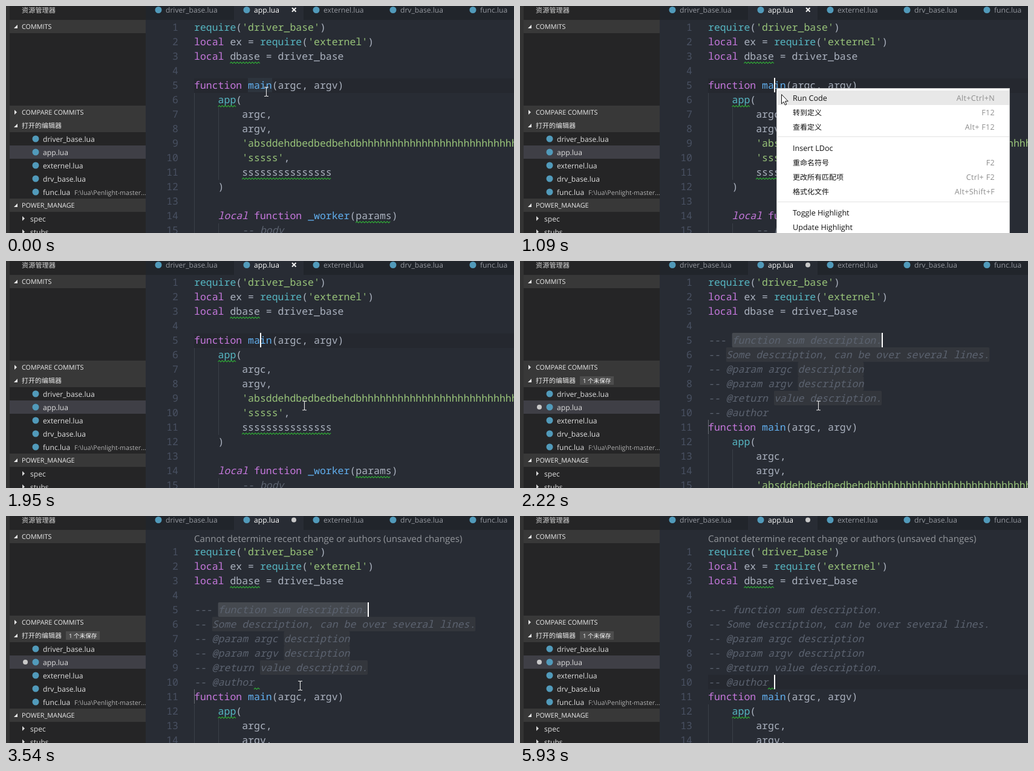
An HTML page for the animation above (6080 ms loop, 840 by 376 pixels).

```html
<!DOCTYPE html>
<html lang="en">
<head>
<meta charset="utf-8">
<title>Insert doc comment</title>
<style>
  html, body { margin: 0; width: 100%; height: 100%; overflow: hidden; background: #282c34; }
  svg { display: block; width: 840px; height: 376px; }
  text { white-space: pre; text-rendering: geometricPrecision; fill: #abb2bf; }
  .code { font: 500 16.5px "Noto Sans Mono", "DejaVu Sans Mono", monospace; }
  .num { fill: #495162; text-anchor: end; }
  .ui { font-family: "Open Sans", "Noto Sans CJK SC", "Noto Sans CJK", sans-serif; }
  .k { fill: #c678dd; }
  .i { fill: #c678dd; font-style: italic; }
  .b { fill: #56b6c2; }
  .f { fill: #61afef; }
  .s { fill: #98c379; }
  .c { fill: #5c6370; font-style: italic; }
</style>
</head>
<body>
<svg id="stage" viewBox="0 0 840 376"></svg>
<script>
const LOOP = 6080;
const COL = 9.9, LINE = 24, LEFT = 311, TOP = 24;
const stage = document.getElementById('stage');

function add(parent, tag, attrs = {}, text) {
  const el = document.createElementNS('http://www.w3.org/2000/svg', tag);
  for (const key in attrs) el.setAttribute(key, attrs[key]);
  if (text !== undefined) el.textContent = text;
  parent.appendChild(el);
  return el;
}
const group = parent => add(parent, 'g');
const rect = (parent, x, y, width, height, fill) =>
  add(parent, 'rect', { x, y, width, height, fill });
const label = (parent, x, y, size, fill, text, more = {}) =>
  add(parent, 'text', { x, y, class: 'ui', style: `font-size:${size}px;fill:${fill}`, ...more }, text);
const shape = (parent, points, fill) => add(parent, 'polygon', { points, fill });
const dot = (parent, cx, cy, r, fill) => add(parent, 'circle', { cx, cy, r, fill });

const colX = col => LEFT + col * COL;
const lineY = line => TOP + (line - 1) * LINE;

// Tokens are split by "|"; a leading "x:" names the token's class.
function codeText(parent, x, y, source) {
  const el = add(parent, 'text', { class: 'code', x, y });
  for (const part of source.split('|')) {
    const [, kind, text] = part.match(/^(?:([a-z]):)?(.*)$/);
    add(el, 'tspan', kind ? { class: kind } : {}, text);
  }
}
function codeLines(parent, lines) {
  lines.forEach((source, i) => source && codeText(parent, LEFT, lineY(i + 1) + 17, source));
}
function squiggle(parent, line, from, count) {
  const end = colX(from + count), y = lineY(line) + 23.2;
  let d = `M${colX(from)} ${y}`;
  for (let x = colX(from) + 2, up = true; x <= end; x += 2.5, up = !up) d += `L${x} ${up ? y - 2.4 : y}`;
  add(parent, 'path', { d, fill: 'none', stroke: '#2fa835', 'stroke-width': 1.1 });
}
const guide = (parent, col, from, to) =>
  rect(parent, Math.round(colX(col)), lineY(from), 1, (to - from + 1) * LINE, '#3b4048');
const mark = (parent, line, col, count, fill) =>
  add(parent, 'rect', { x: colX(col), y: lineY(line) - 1, width: count * COL, height: LINE, rx: 2, fill });
const caret = (parent, line, x) => rect(parent, x, lineY(line) - 1, 2, LINE, '#fff');

// Each track holds [time, value] steps, applied as hard changes.
const tracks = [];
const track = (steps, apply) => tracks.push({ steps, apply, last: null });
const fade = (el, ...steps) => track(steps, v => {
  el.style.display = v ? '' : 'none';
  el.style.opacity = v;
});

const head = ["b:require|(|s:'driver_base'|)", "k:local| ex = |b:require|(|s:'externel'|)",
  'k:local| dbase = driver_base', ''];
const body = ['k:function| |f:main|(argc, argv)', '    |b:app|(', '        argc,', '        argv,',
  "        |s:'absddehdbedbedbehdb" + 'h'.repeat(32), "        |s:'sssss'|,", '        sssssssssssssss',
  '    )', '', '    |i:local| |k:function| |f:_worker|(params)', '        |c:-- body'];
const doc = ['--- function sum description.', '-- Some description, can be over several lines.',
  '-- @param argc description', '-- @param argv description', '-- @return value description.',
  '-- @author '].map(text => 'c:' + text);

rect(stage, 0, 0, 840, 376, '#282c34');
const BAND = '#25282f';

// Code before the insertion
const before = group(stage);
rect(before, LEFT, lineY(5), 529, LINE, BAND);
const wordMark = rect(before, 400, lineY(5) - 1, 40, LINE, '#2d343d');
guide(before, 0, 6, 15);
guide(before, 4, 7, 11);
guide(before, 4, 15, 15);
codeLines(before, [...head, ...body]);
[[3, 6, 5], [6, 4, 3], [11, 8, 15], [14, 27, 6]].forEach(s => squiggle(before, ...s));
const firstCaret = caret(before, 5, 420);
fade(before, [0, 1], [2100, 0]);
fade(wordMark, [0, 1], [700, 0]);
fade(firstCaret, [0, 0], [850, 1]);

// Code after the insertion, later pushed down one line
const after = group(stage);
const band = rect(after, LEFT, lineY(10) - 1, 529, LINE, BAND);
const fields = group(after);
mark(fields, 5, 4, 25, '#45494f');
[[6, 3, 44], [7, 15, 11], [8, 15, 11], [9, 11, 18]].forEach(m => mark(fields, ...m, '#33363c'));
rect(fields, LEFT, lineY(11) - 1, 1, LINE, '#686c72');
guide(after, 0, 12, 15);
guide(after, 4, 13, 15);
codeLines(after, [...head, ...doc, ...body.slice(0, 5)]);
caret(fields, 5, 598);
const marks = group(after);
[[3, 6, 5], [12, 4, 3], [10, 10, 1]].forEach(s => squiggle(marks, ...s));
const lastCaret = caret(after, 10, 420);
fade(after, [0, 0], [2100, 1]);
fade(fields, [0, 1], [3980, 0]);
fade(band, [0, 0], [3980, 1]);
fade(marks, [0, 0], [2610, 1]);
fade(lastCaret, [0, 0], [3980, 1], [4590, 0], [5020, 1], [5530, 0], [5930, 1]);

const gutter = group(stage);
for (let n = 1; n <= 15; n++)
  add(gutter, 'text', { class: 'code num', x: 285, y: lineY(n) + 17 }, n);
track([[0, 0], [2490, LINE]], dy => {
  for (const el of [after, gutter]) el.setAttribute('transform', `translate(0 ${dy})`);
});

const lens = label(stage, LEFT, 43, 15.1, '#94979c',
  'Cannot determine recent change or authors (unsaved changes)');
fade(lens, [0, 0], [3010, .1], [3130, .3], [3270, .52], [3400, .78], [3540, 1]);

// Signature popup
const hint = group(stage);
add(hint, 'rect', { x: 400.5, y: 87.5, width: 258, height: 31, fill: '#2d2d30', stroke: '#454545' });
codeText(hint, 406, 109, body[0]);
fade(hint, [0, 0], [430, .5], [580, 1], [700, 0]);

// Tabs
rect(stage, 231, 0, 609, 23, '#21252b');
rect(stage, 377, 0, 115, 24, '#282c34');
[['driver_base.lua', 231], ['app.lua', 377], ['externel.lua', 492], ['drv_base.lua', 619],
  ['func.lua', 751]].forEach(([name, x]) => {
  const active = name === 'app.lua';
  dot(stage, x + 21, 6.5, 5.5, '#519aba');
  label(stage, x + 33, 11, 12.1, active ? '#fff' : '#95989f', name);
});
const cross = add(stage, 'path', { d: 'M473 3l6.5 6.5M479.5 3l-6.5 6.5', stroke: '#f0f0f0', 'stroke-width': 2 });
const dirty = group(stage);
dot(dirty, 476, 6.5, 4, '#c8c8c8');

// Sidebar
rect(stage, 0, 0, 231, 376, '#252526');
rect(stage, 0, 0, 6, 376, '#333');
label(stage, 26, 11, 11.2, '#d8d8d8', '资源管理器');
[['COMMITS', 34, true], ['COMPARE COMMITS', 176, false], ['打开的编辑器', 198, true],
  ['POWER_MANAGE', 330, true]].forEach(([name, y, open]) => {
  rect(stage, 6, y - 11, 225, 22, '#383838');
  shape(stage, open ? `19,${y - 3} 19,${y + 3} 13,${y + 3}` : `14,${y - 4} 18,${y} 14,${y + 4}`, '#e8e8e8');
  label(stage, 26, y + 4, name === '打开的编辑器' ? 11 : 10.8, '#ececec', name, { 'font-weight': 500 });
});
rect(stage, 6, 231, 225, 22, '#3f3f46');
['driver_base', 'app', 'externel', 'drv_base', 'func'].forEach((name, i) => {
  const y = 220 + i * 22;
  dot(stage, 49, y, 5.5, '#519aba');
  label(stage, 61, y + 4.5, 12.1, '#e0e0e0', name + '.lua');
});
label(stage, 113, 312.5, 10.65, '#b0b0b0', 'F:\\lua\\Penlight-master...');
[['spec', 352], ['stubs', 374]].forEach(([name, y]) => {
  shape(stage, `27,${y - 4} 31,${y} 27,${y + 4}`, '#d8d8d8');
  label(stage, 40, y + 4.5, 12.1, '#e0e0e0', name);
});
rect(dirty, 99, 191, 56, 14, '#4d4d4d');
label(dirty, 104, 201.5, 9.6, '#fff', '1 个未保存', { 'font-weight': 500 });
dot(dirty, 32, 242, 4, '#c8c8c8');
stage.appendChild(dirty);
fade(dirty, [0, 0], [2220, 1]);
fade(cross, [0, 1], [2220, 0]);

// Context menu
const menu = group(stage);
add(menu, 'rect', { x: 424.5, y: 136.5, width: 385, height: 250, fill: '#fff', stroke: '#c4c4c4' });
const hover = rect(menu, 426, 0, 383, 24, '#e8e8e8');
[216, 324].forEach(y => rect(menu, 426, y, 383, 1, '#e2e2e2'));
[['Run Code', 152, 'Alt+Ctrl+N'], ['转到定义', 176, 'F12'], ['查看定义', 200, 'Alt+ F12'],
  ['Insert LDoc', 235], ['重命名符号', 259, 'F2'], ['更改所有匹配项', 283, 'Ctrl+ F2'],
  ['格式化文件', 307, 'Alt+Shift+F'], ['Toggle Highlight', 342], ['Update Highlight', 366]
].forEach(([name, y, keys]) => {
  label(menu, 451, y + 4.5, /^[A-Z]/.test(name) ? 12.6 : 12, '#111', name);
  if (keys) label(menu, 785, y + 4.5, 12.6, '#8e8e8e', keys, { 'text-anchor': 'end', 'letter-spacing': .3 });
});
fade(menu, [0, 0], [970, .5], [1090, 1], [1950, 0]);
track([[0, -50], [1090, 152], [1240, 176], [1390, 200], [1520, 235]], y => hover.setAttribute('y', y - 12));

// Pointer
const beam = add(stage, 'path', {
  d: 'M-3.5 -7.5H-1L0 -6.5L1 -7.5H3.5M0 -6.5V6.5M-3.5 7.5H-1L0 6.5L1 7.5H3.5',
  fill: 'none', stroke: '#e6e6e6', 'stroke-width': 1.1
});
const arrow = add(stage, 'path', {
  d: 'M.5 .5V16L4 12.7L6.4 18L8.8 17L6.5 11.8H11.3Z', fill: '#fff', stroke: '#111', 'stroke-width': 1
});
track([[0, [beam, 430.5, 142]], [120, [beam, 425.5, 136.5]], [970, [arrow, 425, 136]],
  [1090, [arrow, 432, 146]], [1240, [arrow, 458, 176]], [1390, [arrow, 478, 206]],
  [1520, [arrow, 491, 238]], [1950, [beam, 493.5, 239.5]], [3010, [beam, 494.5, 241]],
  [3270, [beam, 494.5, 246]], [3400, [beam, 492.5, 259]], [3540, [beam, 486.5, 281]],
  [5140, [beam, 495.5, 281]], [5290, [beam, 540.5, 284]], [5410, [beam, 650.5, 262]],
  [5530, [beam, 762.5, 230]], [5650, [null, 0, 0]]], ([kind, x, y]) => {
  for (const el of [beam, arrow]) {
    el.style.display = el === kind ? '' : 'none';
    el.setAttribute('transform', `translate(${x} ${y})`);
  }
});

const start = performance.now();
function draw() {
  const t = (performance.now() - start) % LOOP;
  for (const tr of tracks) {
    let step = tr.steps[0];
    for (const s of tr.steps) if (s[0] <= t) step = s;
    if (step !== tr.last) tr.apply((tr.last = step)[1]);
  }
  requestAnimationFrame(draw);
}
draw();
</script>
</body>
</html>
```
